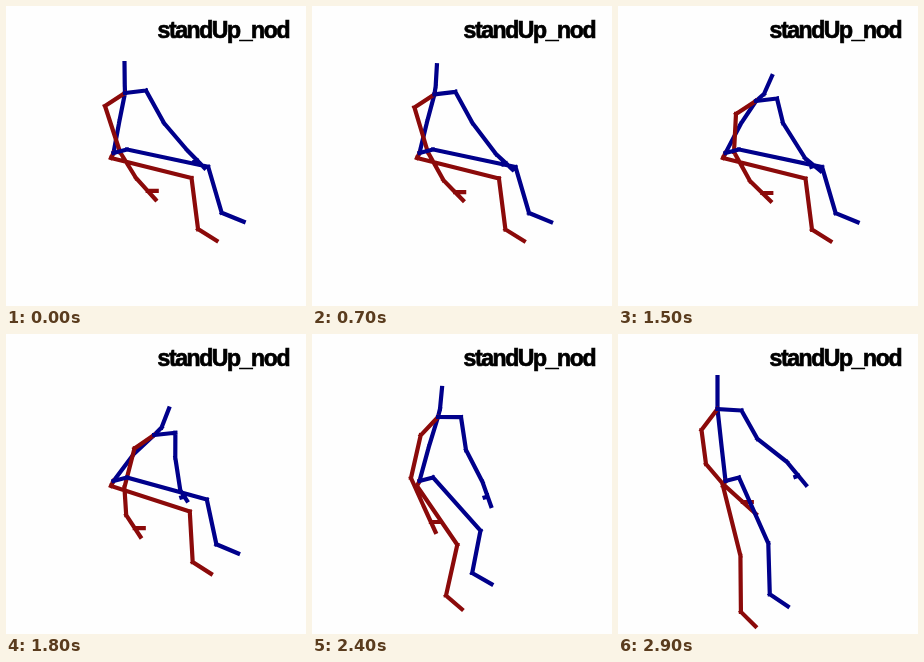
An HTML page for the animation above (3 s loop, 300 by 300 pixels).

```html
<!DOCTYPE html>
<html lang="en">
<head>
<meta charset="utf-8">
<title>standUp_nod</title>
<style>
  html, body { margin: 0; width: 100%; height: 100%; overflow: hidden; background: #fefefe; }
  svg { display: block; width: 100vw; height: 100vh; }
  path { fill: none; stroke: #00008b; stroke-width: 4.2; stroke-linecap: square; }
  #right { stroke: #8b0a0a; }
  text {
    font: bold 23px "Liberation Sans", Arial, sans-serif;
    letter-spacing: -1.4px;
    stroke: #000;
    stroke-width: .7;
  }
</style>
</head>
<body>
<svg viewBox="0 0 300 300">
  <path id="torso"/>
  <path id="right"/>
  <path id="left"/>
  <text x="151.5" y="31.5">standUp_nod</text>
</svg>
<script>
const LOOP = 3000, STEP = 100, HOLD = 200;
const POSES = [HOLD, 1500, 2000, 2400, 2900]; // sit, lean, lift, rise, stand

const clamp = u => Math.min(1, Math.max(0, u));
const part = (t, from, to) => clamp((t - from) / (to - from));
const smooth = u => u * u * (3 - 2 * u);
const add = (p, x, y) => [p[0] + x, p[1] + y];
const mix = (a, b, u, v = u) => [a[0] + (b[0] - a[0]) * u, a[1] + (b[1] - a[1]) * v];

// Key points, one per pose; drift is the share of the lean reached while still seated.
function track(drift, points) {
  const keys = points.split(" ").map((s, i) => ({ t: POSES[i], p: s.split(",").map(Number) }));
  const [sit, lean] = keys;
  const seated = (t, u) => ({ t, p: mix(sit.p, lean.p, u) });
  keys.splice(1, 0, seated(700, drift), seated(1100, drift * 1.2));
  return keys;
}

const head = track(.18, "118.5,57 154,70 160.5,73 130,54 99.5,43");
const chest = track(.18, "119,87 138,95 149,101 126,83 99.5,75");
const arms = {
  L: {
    elbow: track(.35, "158,117 165,117 169,126 154,116 139.5,105"),
    wrist: track(.5, "181,144 187,152 167,157 170.5,148 169,128"),
    tip: track(.55, "198.5,162 202.5,165 169.5,168 179,172 188,151")
  },
  R: {
    elbow: track(.9, "114,146 116,146 117,156 99,144 88,130"),
    wrist: track(.7, "130,172 132,175 113,183 112,173 105,150"),
    tip: track(.5, "149.5,193.5 152.5,195 123.5,206 123.5,198 138,180")
  }
};

const rate = (a, b, k) => (b.p[k] - a.p[k]) / (b.t - a.t);

function slope(keys, i, k) {
  const a = keys[i - 1], b = keys[i], c = keys[i + 1];
  if (!a) return rate(b, c, k);
  if (!c) return rate(a, b, k) * .6;
  const before = b.t - a.t, after = c.t - b.t;
  return (rate(a, b, k) * after + rate(b, c, k) * before) / (before + after);
}

// Cubic Hermite curve through the keys.
function follow(keys, t) {
  let i = 0;
  while (i < keys.length - 2 && t >= keys[i + 1].t) i++;
  const a = keys[i], b = keys[i + 1], span = b.t - a.t;
  const u = (t - a.t) / span, v = 1 - u;
  return [0, 1].map(k => a.p[k] * smooth(v) + b.p[k] * smooth(u)
    + span * u * v * (slope(keys, i, k) * v - slope(keys, i + 1, k) * u));
}

const base = [107.5, 147];
const legs = {
  L: { hip: [121, 143.5], from: 12, to: 66, shin: [13.5, 46], turn: -12, bend: 8, toe: [22, 9] },
  R: { hip: [105, 152], from: 14, to: 76, shin: [6.5, 51], turn: -6, bend: 4, toe: [18.5, 11.5] }
};

// The thigh swings down while the shin folds back and straightens again.
function legPoints(leg, t) {
  const r = smooth(part(t, 1600, 2900)), fold = Math.sin(Math.PI * r);
  const angle = (leg.from + (leg.to - leg.from) * r) * Math.PI / 180;
  const thigh = 85 - 36 * r + 23 * r * r - 2 * (1 - part(t, HOLD, 900));
  const knee = add(leg.hip, thigh * Math.cos(angle), thigh * Math.sin(angle));
  const ankle = add(knee,
    leg.shin[0] + leg.turn * r - 16 * fold,
    leg.shin[1] + 5 * r - leg.bend * fold);
  return [base, leg.hip, knee, ankle, add(ankle, leg.toe[0] - 4 * r, leg.toe[1] + 3 * r)];
}

function armPoints(side, top, t) {
  const r = smooth(part(t, 1600, 2900));
  const shoulder = side === "L" ? add(top, 21 + 3 * r, 4 * r - 2.5) : add(top, 4 * r - 20, 13 + 8 * r);
  const [elbow, wrist, tip] = ["elbow", "wrist", "tip"].map(n => follow(arms[side][n], t));
  const hand = mix(wrist, tip, .6);
  const thumb = side === "L" ? add(hand, -3, 1) : add(hand, 9, 0);
  return [[top, shoulder, elbow, wrist, hand, tip], [hand, thumb]];
}

// Every bone is its own stroke, so each joint shows square ends.
function bones(chains) {
  const at = p => p.map(n => n.toFixed(2)).join(" ");
  return chains.map(c => c.slice(1).map((p, i) => `M${at(c[i])}L${at(p)}`).join("")).join("");
}

function draw(time) {
  const t = Math.max(HOLD, Math.floor((time % LOOP) / STEP) * STEP);
  const top = follow(chest, t), crown = follow(head, t);
  const neck = mix(top, crown, .5, .28);
  const spine = add(mix(base, top, .5), 0, (base[0] - top[0]) * .1);
  const limbs = side => [...armPoints(side, top, t), legPoints(legs[side], t)];
  const show = (id, chains) => document.getElementById(id).setAttribute("d", bones(chains));
  show("torso", [[crown, neck, top, spine, base]]);
  show("right", limbs("R"));
  show("left", limbs("L"));
}

const start = performance.now();
function tick() {
  draw(performance.now() - start);
  requestAnimationFrame(tick);
}
tick();
</script>
</body>
</html>
```
